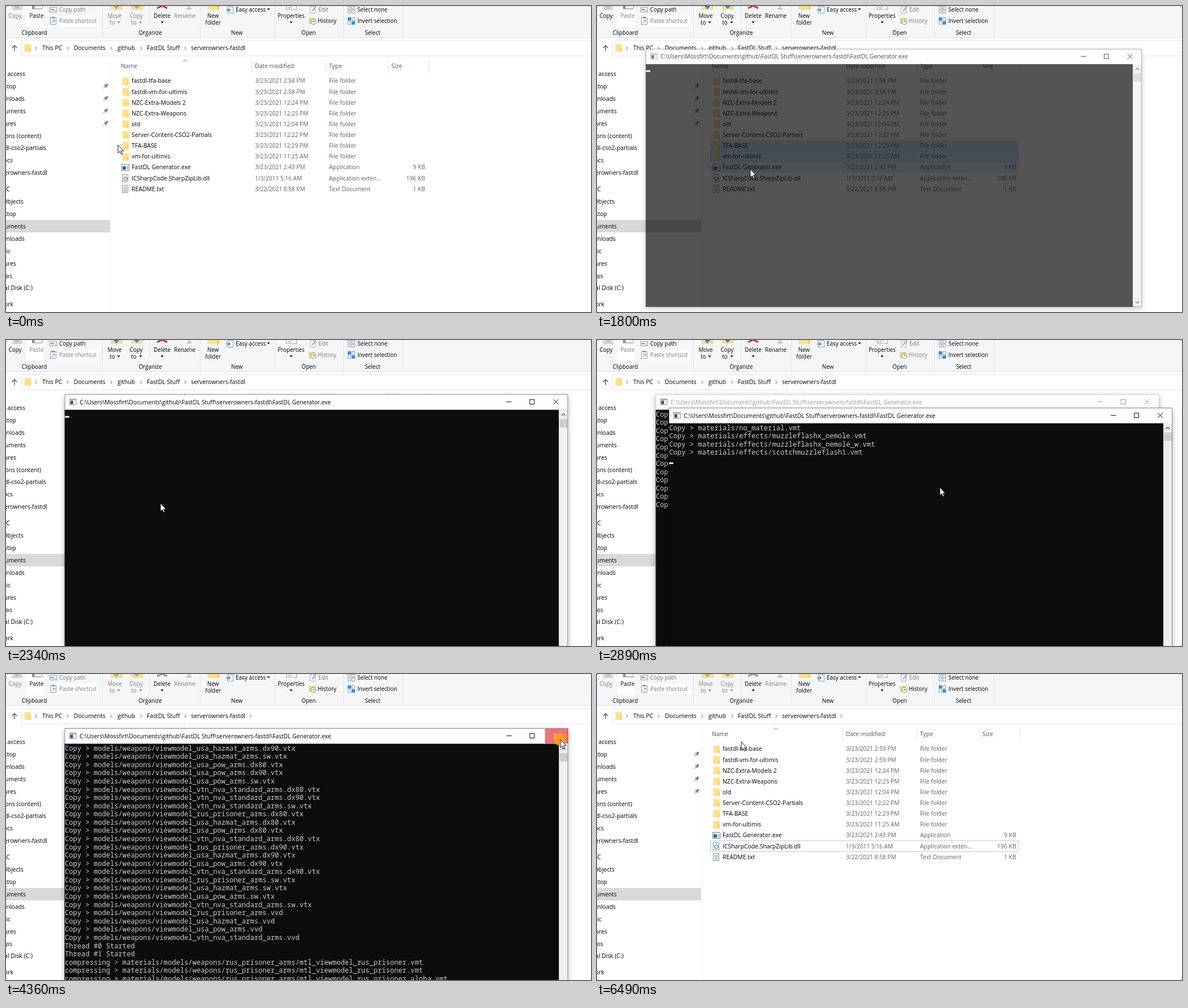
Recreate the animation shown at these times as an HTML page. Size 1034 by 542 pixels, loop 6.72 s.

```html
<!DOCTYPE html>
<html lang="en">
<head>
<meta charset="utf-8">
<title>File manager</title>
<style>
html,body{margin:0;width:100%;height:100%;overflow:hidden;background:#fff}
svg{display:block;width:1034px;height:542px;font:10.4px "Open Sans","Noto Sans",sans-serif;fill:#000;overflow:hidden}
.rib{font-size:9.9px}
.grey{fill:#606060}
.date{fill:#606060;font-size:10.15px}
.head{fill:#42566f}
.mid{text-anchor:middle}
.end{text-anchor:end}
.need{fill:#7c7c7c}
.sel .need{fill:#000}
.sel .paste,.multi .single{fill:#7c7c7c}
.dim{fill:#757575}
.line{fill:none;stroke:#e2e3e4}
.arrow{fill:#9dacc2}
.sel .arrow{fill:#2f86dc}
.cross{stroke:#8b93a5}
.red .cross{stroke:#cc2a36}
.win{color:#000}
.win.off{color:#999}
.title{font-size:10.3px;fill:currentColor}
.con{font:12.13px "Noto Sans Mono","DejaVu Sans Mono",monospace;fill:#ccc}
.glyph{fill:none;stroke:currentColor}
.hot .closeBg{fill:#f1707a}
.hot .closeX{stroke:#fff}
.closeBg{fill:none}
.off .block{display:none}
</style>
</head>
<body>
<svg id="stage" viewBox="0 0 1034 542"></svg>
<script>
const LOOP = 6720, ROW_Y = 123.1, ROW_H = 19.12, LINE_H = 14.58;
const stage = document.getElementById('stage');
const $ = id => document.getElementById(id);

const text = (x, y, s, cls = '') => `<text x="${x}" y="${y + 3.8}" class="${cls}">${s}</text>`;
const box = (x, y, w, h, fill, more = '') => `<rect x="${x}" y="${y}" width="${w}" height="${h}" fill="${fill}" ${more}/>`;
const path = (d, more = '') => `<path d="${d}" ${more}/>`;
const drop = (x, y, cls = '') => path(`M${x - 2.7} ${y - 1.4}h5.4l-2.7 2.9z`, `class="${cls}"`);
const stroke = (d, color, w = 1) => path(d, `fill="none" stroke="${color}" stroke-width="${w}"`);
const folder = (x, y) => box(x + .5, y - 6.5, 11.5, 13.5, '#ffe08a') + box(x + 9, y, 3, 7, '#f5d272');
const page = (x, y) => box(x + .5, y - 6.5, 10, 13, '#fff', 'stroke="#8d949b"');

function ribbon() {
  const mid = [[16, 17, 'Copy', 'need'], [54, 17, 'Paste', 'paste'], [50, 47, 'Clipboard'], [192, 17, 'Move', 'need'],
    [188, 29, 'to', 'need'], [230, 17, 'Copy', 'need'], [226, 29, 'to', 'need'], [255, 47, 'Organize'], [276, 17, 'Delete'],
    [316, 17, 'Rename', 'need'], [366, 17, 'New'], [366, 29, 'folder'], [408, 47, 'New'], [504, 17, 'Properties'],
    [535, 47, 'Open'], [648, 47, 'Select']];
  const left = [[94, 6, 'Copy path', 'need'], [94, 26, 'Paste shortcut', 'dim'], [406, 6, 'Easy access'], [552, 6, 'Edit', 'dim'],
    [551, 26, 'History', 'single'], [621, 6, 'Select none'], [621, 26, 'Invert selection']];
  const tiles = (x, y, fill) => [0, 7].map(i => [0, 7].map(j =>
    box(x + i + .5, y + j + .5, 5, 5, fill, 'stroke="#8aa2bb"')).join('')).join('');
  return box(0, 0, 1034, 55, '#f5f6f7') + box(0, 55, 1034, 1, '#dcddde')
    + box(36, 0, 30, 37, '#fff') + box(76, 17, 88, 19, '#fff')
    + [170, 343, 475, 596, 701].map(x => path(`M${x + .5} 0V53`, 'class="line"')).join('') + path('M254.5 0V31', 'class="line"')
    + box(12.5, -6, 14, 12, '#e9eef5', 'stroke="#9aa8ba"') + stroke('M15 1.5h9M15 3.5h9', '#7b95b8')
    + box(46, -6, 17, 11.5, '#7f8ea8') + box(50, -6, 14, 11, '#fff', 'stroke="#8393ad"')
    + box(77.5, 2.5, 12, 8, '#fff', 'stroke="#8a9bb0"') + stroke('M79 5l1.5 3 1.5-3 1.5 3 1.5-3M86 8h2', '#50657f')
    + box(78.5, 20.5, 10, 12, '#fff', 'stroke="#8296b3"') + box(81, 19, 5, 3, '#8296b3') + stroke('M81 30l5-5h-3.5M86 25v3.5', '#5b87bd')
    + folder(184, 0) + box(196, -4, 10, 10.5, '#f9dc8d') + path('M190 0h10l-5 6z', 'class="arrow"')
    + box(221, -4, 21, 10.5, '#f9dc8d') + path('M226 0h10l-5 5z', 'class="arrow"')
    + path('M267-5l18 9M285-5l-18 9', 'class="cross" fill="none" stroke-width="3"')
    + stroke('M319 5h9M323.5 5v-6', '#77889d')
    + box(356, -4, 21, 10.5, '#ffdf86') + box(373, -2, 4, 8.5, '#f3cc65')
    + box(391.5, 1.5, 10, 11, '#fff', 'stroke="#8a9bb0"') + stroke('M389 7h7M393 4l3 3-3 3', '#2f7bc9', 1.4)
    + box(495.5, -6, 18, 12, '#fff', 'stroke="#9aa0a6"') + stroke('M498 2l3 2 6-6', '#6f7a88')
    + box(537.5, .5, 9, 12, '#fff', 'stroke="#9fb0c4"') + stroke('M541 9l7-8', '#8fa9c7', 2)
    + box(535, 21, 12, 11, '#f2d683') + '<circle cx="543.5" cy="28" r="4.5" fill="#fff" stroke="#5c8a57"/>' + stroke('M543.5 25.5V28h2.5', '#456')
    + tiles(604, 0, '#fff') + tiles(604, 20, '#fff') + box(604, 20, 6, 6, '#3c8edb') + box(611, 27, 6, 6, '#3c8edb')
    + mid.map(([x, y, s, c = '']) => text(x, y, s, 'rib mid ' + c)).join('')
    + left.map(([x, y, s, c = '']) => text(x, y, s, 'rib ' + c)).join('')
    + drop(199, 29, 'need') + drop(238, 29, 'need') + drop(276, 29) + drop(464, 6) + drop(504, 29);
}

function addressBar() {
  const crumbs = [[64, 'This PC'], [120, 'Documents'], [197, 'github'], [249, 'FastDL Stuff'], [327, 'serverowners-fastdl']];
  const chev = x => `M${x - 1.5} 72l2.8 2.8-2.8 2.8`;
  return path('M1040 61.5H27.5V88.5H1040', 'class="line"') + stroke('M15 80V70M10.5 74.5L15 70l4.5 4.5', '#555', 1.4)
    + folder(32, 74) + crumbs.map(([x, s]) => text(x, 74.5, s)).join('')
    + stroke([53, 109, 186, 239, 317].map(chev).join(''), '#555')
    + `<g id="lastChev">${stroke(chev(432), '#555')}</g>`;
}

function sidebar() {
  const items = [[34, 120, 'Quick access'], [18, 142, 'Desktop'], [33, 164, 'Downloads'], [35, 186, 'Documents'], [18, 208, 'Pictures'],
    [62, 230, 'addons (content)'], [71, 251, 'fastdl-cso2-partials'], [12, 273, 'docs'], [73, 295, 'serverowners-fastdl'],
    [7, 324, 'This PC'], [31, 346, '3D Objects'], [18, 368, 'Desktop'], [35, 390, 'Documents'], [33, 412, 'Downloads'],
    [8, 434, 'Music'], [18, 456, 'Pictures'], [11, 478, 'Videos'], [47, 499, 'Local Disk (C:)'], [13, 528, 'Network']];
  const pin = y => `<g transform="translate(176 ${y}) rotate(45)">` + box(-2, -5, 4, 5, '#7b8793') + box(-3.5, -.5, 7, 1.6, '#7b8793') + box(-.5, 1, 1, 5, '#7b8793') + '</g>';
  return box(0, 379, 184, 22, '#d9d9d9') + box(186, 94, 1, 448, '#f3f3f3')
    + items.map(([x, y, s]) => text(x, y, s, 'end')).join('') + [142, 164, 186, 208].map(pin).join('');
}

function fileList() {
  const files = [['fastdl-tfa-base', '3/23/2021 2:58 PM'], ['fastdl-vm-for-ultimis', '3/23/2021 2:58 PM'],
    ['NZC-Extra-Models 2', '3/23/2021 12:24 PM'], ['NZC-Extra-Weapons', '3/23/2021 12:25 PM'], ['old', '3/23/2021 12:04 PM'],
    ['Server-Content-CSO2-Partials', '3/23/2021 12:22 PM'], ['TFA-BASE', '3/23/2021 12:29 PM'], ['vm-for-ultimis', '3/23/2021 11:25 AM'],
    ['FastDL Generator.exe', '3/23/2021 2:43 PM', 'Application', '9 KB'],
    ['ICSharpCode.SharpZipLib.dll', '1/3/2011 5:16 AM', 'Application exten...', '196 KB'],
    ['README.txt', '3/22/2021 8:58 PM', 'Text Document', '1 KB']];
  const icon = (i, y) => i < 8 ? folder(205, y)
    : i == 8 ? box(204.5, y - 5.5, 13, 11, '#fff', 'stroke="#77818c"') + box(206, y - 2, 6, 6, '#2468b4') + box(213, y - 2, 3, 5, '#b9c4cf')
    : i == 9 ? page(205, y) + `<circle cx="211" cy="${y + 1}" r="3" fill="none" stroke="#7d8d9d" stroke-width="1.6"/>`
    : page(205, y) + stroke([-4, -2, 0, 2, 4].map(d => `M207.5 ${y + d + .5}h6.5`).join(''), '#9aa3ab');
  return box(187, 95, 247, 23, '#d9ebf9', 'id="headHover"')
    + [434, 565, 675, 747].map(x => path(`M${x + .5} 95V118`, 'class="line"')).join('')
    + stroke('M313 98.5l3.2-3 3.2 3', '#666')
    + [[203, 'Name'], [440, 'Date modified'], [571, 'Type'], [681, 'Size']].map(([x, s]) => text(x, 106.5, s, 'head')).join('')
    + files.map(([name, date, type = 'File folder', size = ''], i) => {
      const y = ROW_Y + ROW_H * (i + .5);
      return box(200.5, y - ROW_H / 2, 544, ROW_H, 'none', `id="row${i}"`) + icon(i, Math.round(y)) + text(222, y, name)
        + `<g id="date${i}">${text(440, y, date, 'date')}</g>` + text(571, y, type, 'grey') + text(741, y, size, 'grey end');
    }).join('');
}

function consoleWindow(id) {
  const lines = Array.from({length: 30}, (_, i) => `<text class="con" x=".5" y="${39.6 + i * LINE_H}"></text>`).join('');
  return `<g id="${id}" class="win"><g style="filter:drop-shadow(0 3px 5px rgba(0,0,0,.3))">${box(0, 0, 890, 464, '#fff')}</g>`
    + box(0, 27.5, 874, 436.5, '#0c0c0c') + box(874, 27.5, 16, 436.5, '#f0f0f0') + box(875, 44, 14, 15, '#cdcdcd')
    + stroke('M878.5 38l3.5-3.5 3.5 3.5M878.5 454l3.5 3.5 3.5-3.5', '#555', 1.3)
    + box(8.5, 8.5, 12, 10, '#fff', 'stroke="#8a9097"') + box(9, 9, 12, 2, '#b5bcc4') + box(10, 11.5, 5, 6, '#31506e')
    + text(26.5, 13.7, 'C:\\Users\\Mossfirt\\Documents\\github\\FastDL Stuff\\serverowners-fastdl\\FastDL Generator.exe', 'title')
    + path('M849 1h41v26h-41z', 'class="closeBg"')
    + path('M781 13.5h9M822.5 9.5h8v8h-8z', 'class="glyph"') + path('M864 9l9 9M873 9l-9 9', 'class="glyph closeX"')
    + lines + box(0, 0, 8, 3, '#f2f2f2', 'class="block"')
    + path('M.5.5h889v463H.5z', 'class="glyph" stroke-opacity=".45"') + '</g>';
}

stage.innerHTML = ribbon() + addressBar() + sidebar() + fileList()
  + box(0, 0, 0, 0, 'rgba(0,120,215,.25)', 'id="lasso" stroke="#0078d7"')
  + ['w1', 'w2', 'w3'].map(consoleWindow).join('')
  + '<g id="pointer"><g id="ghost"><g opacity=".6">' + box(-34, -80, 62, 74, '#ffe08c') + box(-34, -80, 10, 74, '#f3cb62') + box(14, -46, 14, 40, '#f5d06c') + '</g>'
  + box(-10, -52, 18, 18, '#0078d7', 'stroke="#fff"') + '<text x="-1" y="-39.3" class="mid" style="fill:#fff">2</text>'
  + '<g id="tip">' + box(14.5, 11.5, 172, 17, '#fff', 'stroke="#b5b5b5"') + stroke('M19 20h7M23 17l3 3-3 3', '#1b6fc2', 1.5)
  + text(31, 20, 'Open with FastDL Generator.exe', 'rib') + '</g></g>'
  + '<circle id="click" cx="-1.5" cy="-.5" r="11" fill="#f9a11b" fill-opacity=".9"/>'
  + path('M0 0V14.5L3.3 11.5 5.6 16.5 7.8 15.6 5.6 10.7H10Z', 'fill="#fff" stroke="#000" stroke-width=".9"') + '</g>';

// Console output
const arms = ['rus_prisoner', 'usa_hazmat', 'usa_pow', 'vtn_nva_standard'];
const exts = ['dx80.vtx', 'dx90.vtx', 'sw.vtx', 'vvd'];
const mats = arms.flatMap(a => ['.vmt', '_alpha.vmt', '.vtf'].map(e => `materials/models/weapons/${a}_arms/mtl_viewmodel_${a}${e}`));
const model = (a, e) => `models/weapons/viewmodel_${a}_arms.${e}`;
const copy = s => 'Copy > ' + s;
const armsLog = [
  ...[...mats, ...arms.flatMap(a => exts.slice(0, 3).map(e => model(a, e))), ...exts.flatMap(e => arms.map(a => model(a, e)))].map(copy),
  'Thread #0 Started', 'Thread #1 Started', ...[0, 0, 1].map(i => 'compressing > ' + mats[i])];
const effectsLog = ['no_material', 'effects/muzzleflashx_nemole', 'effects/muzzleflashx_nemole_w',
  ...Array.from({length: 47}, (_, i) => `effects/scotchmuzzleflash${(i >> 1) + 1}${i % 2 ? 'w' : ''}`)].map(s => copy(`materials/${s}.vmt`));

// Screen refreshes as [first, last, count]
const refreshes = [[0, 0, 1], [70, 600, 8], [750, 1240, 7], [1530, 1530, 1], [1710, 1800, 2], [1860, 2090, 4], [2170, 2340, 3],
  [2420, 2890, 7], [2940, 3040, 2], [3110, 3740, 9], [3810, 4360, 8], [4440, 4440, 1], [4510, 5140, 9], [5220, 5220, 1],
  [5370, 5440, 2], [5520, 6010, 7], [6080, 6490, 6]];
const ticks = refreshes.flatMap(([a, b, n]) => Array.from({length: n}, (_, i) => Math.round((a + (b - a) * i / Math.max(1, n - 1)) / 10) * 10));

// Pointer path as [time, x, y]
const track = [[70, 198, 246], [600, 245, 262], [750, 245, 262], [900, 250, 264], [1240, 272, 289], [1530, 272, 289], [1800, 271, 289],
  [2170, 273, 289], [2420, 273, 289], [2890, 606, 261], [3500, 985, 140], [3680, 995, 134], [3890, 995, 134], [4280, 980, 116],
  [4440, 980, 116], [5140, 258, 124], [5220, 268, 132], [5370, 268, 132], [5440, 240, 162], [5600, 205, 202], [5760, 192, 140],
  [5850, 225, 100], [6010, 250, 150], [6170, 250, 201], [6330, 250, 175], [6490, 255, 120]];

function along(keys, t, k = 1) {
  const i = keys.findIndex(key => key[0] > t);
  if (i < 0) return keys[keys.length - 1][k];
  if (!i) return keys[0][k];
  const a = keys[i - 1], b = keys[i];
  return a[k] + (b[k] - a[k]) * (t - a[0]) / (b[0] - a[0]);
}

const clamp = v => Math.min(1, Math.max(0, v));
const show = (id, on) => $(id).setAttribute('visibility', on ? 'inherit' : 'hidden');
const within = (t, a, b) => t >= a && t < b;

const windows = [
  {id: 'w1', x: 79.5, y: 72.5, open: 1700, close: 2010, fade: 90, log: [], count: [[0, 0]], active: () => true, hot: [0, 0]},
  {id: 'w2', x: 103.5, y: 96, open: 2140, close: 4439, fade: 1, log: armsLog,
    count: [[2340, 0], [2890, 12], [3300, 40], [3400, 42], [3900, 43], [4280, 45]], active: t => t < 2640 || t >= 3780, hot: [4200, 4440]},
  {id: 'w3', x: 127, y: 120, open: 2640, close: 3760, fade: 90, log: effectsLog,
    count: [[2780, 0], [2890, 4], [3600, 50]], active: () => true, hot: [3550, 3900]}];

function drawWindow(w, t) {
  const el = $(w.id), p = 1 - clamp((t - w.open) / 220);
  const alpha = (1 - p * p) * (1 - clamp((t - w.close) / w.fade));
  const scale = .95 + .05 * alpha;
  show(w.id, alpha > 0);
  el.setAttribute('opacity', alpha);
  el.setAttribute('transform', `translate(${w.x + 445 * (1 - scale)} ${w.y + 232 * (1 - scale)}) scale(${scale})`);
  el.classList.toggle('off', !w.active(t));
  el.classList.toggle('hot', within(t, ...w.hot));
  const n = Math.floor(along(w.count, t) + 1e-6), first = Math.max(0, n - 29);
  el.querySelectorAll('.con').forEach((line, i) => line.textContent = first + i < n ? w.log[first + i] : '');
  el.querySelector('.block').setAttribute('y', 38.5 + (n - first) * LINE_H);
}

function drawRows(t, x, y) {
  const focused = t < 1850, hovering = within(t, 750, 1850) || t >= 4440;
  const over = hovering && x >= 200 && x < 745 ? Math.floor((y - ROW_Y) / ROW_H) : -1;
  for (let i = 0; i < 11; i++) {
    const picked = i == 6 && within(t, 140, 3450) || i == 7 && within(t, 434, 3450);
    const row = $('row' + i);
    row.setAttribute('fill', picked ? (focused ? '#cce8ff' : '#d9d9d9') : i == over ? '#e5f3ff' : 'none');
    row.setAttribute('stroke', picked && i == 7 ? (focused ? '#99d1ff' : '#bcbcbc') : i == 9 && t >= 4510 ? '#99d1ff' : 'none');
  }
  show('headHover', t >= 4440 && within(x, 187, 434) && within(y, 95, 118));
  for (const i of [0, 1]) $('date' + i).firstChild.textContent = `3/23/2021 2:${t < 3400 ? 58 : 59} PM`;
  return over;
}

function draw(t) {
  const x = along(track, t, 1), y = along(track, t, 2);
  stage.classList.toggle('sel', within(t, 140, 3450));
  stage.classList.toggle('multi', within(t, 750, 3450));
  stage.classList.toggle('red', t < 3450);
  show('lastChev', t >= 3810);
  const over = drawRows(t, x, y);
  windows.forEach(w => drawWindow(w, t));
  const lasso = $('lasso');
  show('lasso', within(t, 140, 750));
  lasso.setAttribute('x', 198.5);
  lasso.setAttribute('y', 246.5);
  lasso.setAttribute('width', Math.max(0, x - 198));
  lasso.setAttribute('height', Math.max(0, y - 246));
  $('pointer').setAttribute('transform', `translate(${x} ${y})`);
  show('ghost', within(t, 900, 1530));
  show('tip', within(t, 900, 1530) && over == 8);
  show('click', within(t, 3700, 3780) || within(t, 4350, 4440));
}

let shown = -1;
function frame() {
  const now = performance.now() % LOOP;
  const tick = ticks.filter(t => t <= now).pop();
  if (tick !== shown) draw(shown = tick);
  requestAnimationFrame(frame);
}
frame();
</script>
</body>
</html>
```
